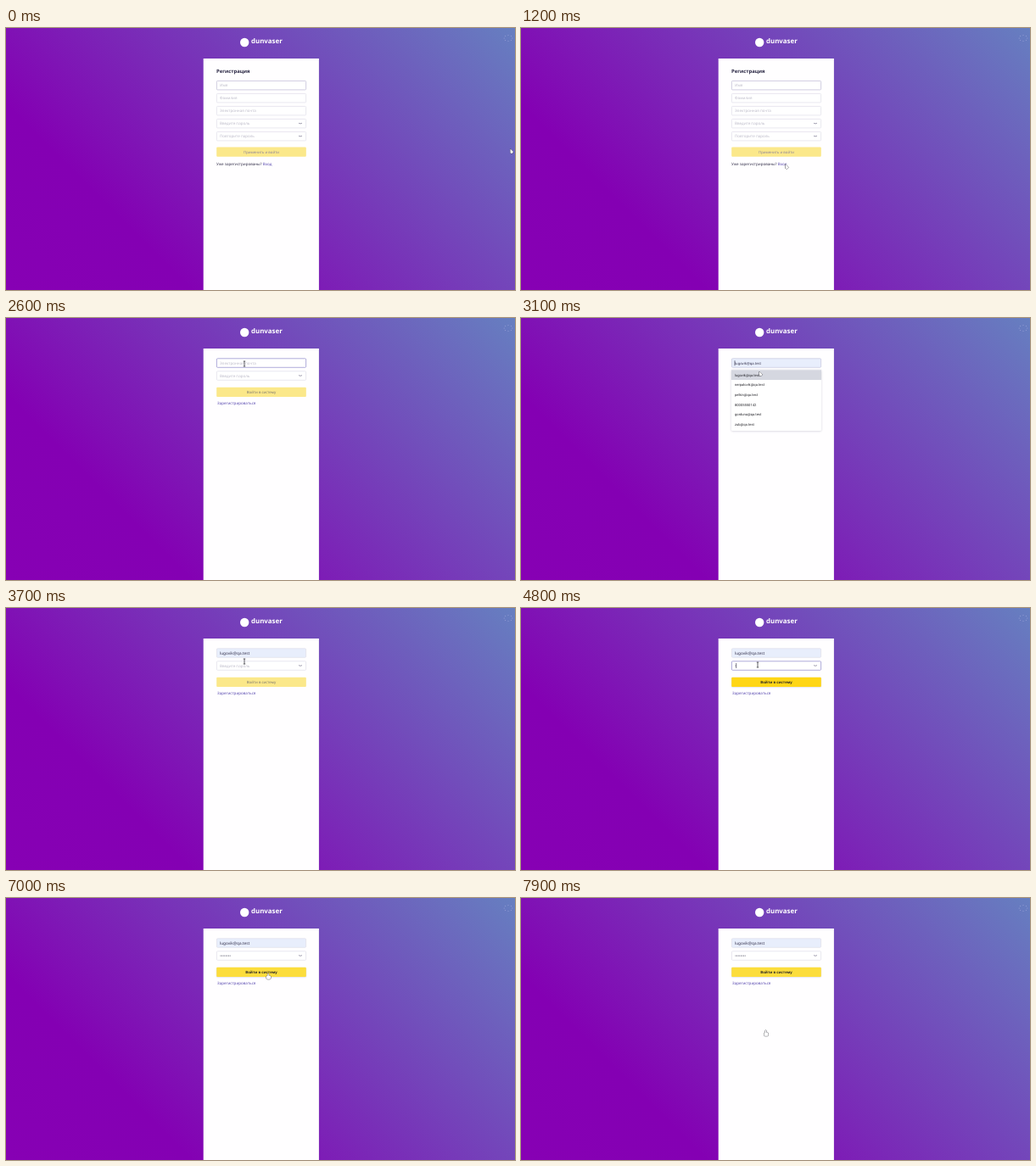
Write an HTML page with a canvas that moves like this. It is 600 px wide and 309 px high and loops after 8 s.

```html
<!DOCTYPE html>
<html lang="ru">
<head>
<meta charset="utf-8">
<title>Вход</title>
<style>
html, body { margin: 0; width: 100%; height: 100%; overflow: hidden; background: #7a20b6; }
canvas { display: block; width: 600px; height: 309px; }
</style>
</head>
<body>
<canvas id="stage"></canvas>
<script>
const W = 600, H = 309, LOOP = 8000, STEP = 100;
const LEFT = 248, ROW = 15;
const canvas = document.getElementById('stage');
const ctx = canvas.getContext('2d');
const dpr = window.devicePixelRatio || 1;
canvas.width = W * dpr;
canvas.height = H * dpr;

const FONT = '"Noto Sans", "Open Sans", sans-serif';
const LIST_FONT = 'Roboto, Inter, sans-serif';
const INK = '#35324c', HINT = '#bdbbc9', LINK = '#5a4bb0', LINE = '#e0deea', FOCUS = '#8f89cc';
const LOGIN = 'lugovik@qa.test';
const SUGGESTIONS = [LOGIN, 'nerpalovik@qa.test', 'pelkin@qa.test', '80005550142', 'gorduna@qa.test', 'zub@qa.test'];
const SIGN_UP_FIELDS = ['Имя', 'Фамилия', 'Электронная почта', 'Введите пароль', 'Повторите пароль'];

// Moments of the story, ms
const AT = { hoverLink: 1300, signIn: 1800, focus: 2600, list: 2700, pick: 2900, picked: 3700, password: 4200, typing: 4800, blur: 6100, press: 7250 };

// Pointer legs; sag bends the path downwards
const START = { x: 594.5, y: 142.5 };
const LEGS = [
  { from: 300, to: 1250, x: 309.5, y: 160, sag: 28 },
  { from: AT.signIn, to: AT.focus, x: 281, y: 54 },
  { from: AT.list, to: AT.pick, x: 281, y: 63 },
  { from: AT.picked, to: AT.password, x: 279, y: 67 },
  { from: 5700, to: 6200, x: 334.5, y: 128 },
  { from: 6300, to: 6900, x: 309, y: 89 },
  { from: AT.press, to: 7900, x: 288.5, y: 156, sag: 100 }
];

const clamp = v => Math.max(0, Math.min(1, v));
const ease = k => k * k * (3 - 2 * k);

function pointerAt(t) {
  let { x, y } = START;
  for (const leg of LEGS) {
    const e = ease(clamp((t - leg.from) / (leg.to - leg.from)));
    x += (leg.x - x) * e;
    y += (leg.y - y) * e + (leg.sag || 0) * Math.sin(Math.PI * e);
  }
  return { x, y };
}

function text(str, x, y, size, color, { weight = 400, align = 'left', family = FONT } = {}) {
  ctx.font = `${weight} ${size}px ${family}`;
  ctx.textAlign = align;
  ctx.fillStyle = color;
  ctx.fillText(str, x, y);
}

function box(x, y, w, h, fill, stroke, r = 1) {
  ctx.beginPath();
  ctx.roundRect(x, y, w, h, r);
  ctx.fillStyle = fill;
  ctx.fill();
  if (!stroke) return;
  ctx.strokeStyle = stroke;
  ctx.lineWidth = 0.7;
  ctx.stroke();
}

function dot(x, y, r, color) {
  ctx.beginPath();
  ctx.arc(x, y, r, 0, Math.PI * 2);
  ctx.fillStyle = color;
  ctx.fill();
}

function shadowed(alpha, blur, draw) {
  ctx.save();
  ctx.shadowColor = `rgba(40, 30, 80, ${alpha})`;
  ctx.shadowBlur = blur * dpr;
  ctx.shadowOffsetY = 0.6 * dpr;
  draw();
  ctx.restore();
}

function field(y, label, { color = HINT, fill = '#fff', border = LINE, size = 4.5, secret = false } = {}) {
  box(LEFT + 0.4, y + 0.4, 105.2, 10.5, fill, border);
  text(label, LEFT + 4, y + 7.3, size, color);
  if (!secret) return;
  ctx.beginPath();
  ctx.moveTo(LEFT + 97, y + 5.2);
  ctx.quadraticCurveTo(LEFT + 99, y + 6.6, LEFT + 101, y + 5.2);
  ctx.strokeStyle = '#8a879c';
  ctx.lineWidth = 0.8;
  ctx.stroke();
}

function button(y, label, fill, color, weight, shade) {
  shadowed(shade, 1.5, () => box(LEFT + 0.2, y, 105.6, 11.1, fill));
  text(label, LEFT + 53, y + 7.1, 4.3, color, { weight, align: 'center' });
}

function caret(x, y) {
  ctx.fillStyle = '#25233a';
  ctx.fillRect(x - 0.3, y - 3, 0.6, 6);
}

function backdrop() {
  const d = (W + H) / 4;
  const g = ctx.createLinearGradient(W / 2 - d, H / 2 + d, W / 2 + d, H / 2 - d);
  g.addColorStop(0, '#8700b4');
  g.addColorStop(0.24, '#8400b3');
  g.addColorStop(1, '#667fc0');
  ctx.fillStyle = g;
  ctx.fillRect(0, 0, W, H);

  dot(281.2, 17, 5.2, '#fff');
  text('dunvaser', 289, 18.2, 7.9, '#fff', { weight: 600 });

  // Expand icon
  for (let a = 0; a < 8; a++)
    dot(592 + 4.8 * Math.cos(a * Math.PI / 4), 12 + 3.6 * Math.sin(a * Math.PI / 4), 0.5, 'rgba(215, 205, 245, .5)');

  box(232.7, 36, 136.2, H, '#fffeff', null, 0);
}

function signUp() {
  text('Регистрация', LEFT, 53.4, 5.9, '#2b2845', { weight: 700 });
  SIGN_UP_FIELDS.forEach((label, i) =>
    field(62 + i * ROW, label, { border: i ? LINE : '#bdb9d4', secret: label.endsWith('пароль') }));
  button(140.6, 'Применить и войти', '#fbe88a', '#8d839a', 400, 0);
  const ask = 'Уже зарегистрированы? ';
  text(ask, LEFT, 162.4, 4.5, INK);
  text('Вход', LEFT + ctx.measureText(ask).width, 162.4, 4.5, LINK);
}

function suggestions(active) {
  shadowed(0.22, 2.5, () => box(LEFT, 61, 106, 72, '#fff'));
  if (active) box(LEFT, 61.3, 106, 11.8, '#d5d7e0', null, 0);
  SUGGESTIONS.forEach((s, i) => text(s, LEFT + 4, 68.7 + i * 11.6, 4.1, '#26262c', { family: LIST_FONT }));
}

function signIn(t, hover) {
  const picked = t >= AT.picked, preview = t >= AT.pick && !picked;
  if (picked || preview)
    field(47.4, LOGIN, { color: INK, fill: '#e8eefc', border: preview ? '#c6c6de' : LINE, size: picked ? 4.7 : 4.15 });
  else
    field(47.4, 'Электронная почта', { border: t >= AT.focus ? FOCUS : LINE });
  if (t >= AT.focus && !picked && t % 1000 < 600) caret(LEFT + 4, 53.2);

  const typed = Math.min(8, Math.max(0, Math.floor((t - AT.typing) / 130) + 1));
  const focused = t >= AT.password && t < AT.blur + 2 * STEP;
  field(62.4, typed ? '' : 'Введите пароль', { border: focused && t < AT.blur ? FOCUS : LINE, secret: true });
  for (let i = 0; i < typed; i++) dot(LEFT + 5 + i * 1.6, 68.1, 0.55, '#6b697d');
  if (focused) caret(LEFT + 4.2 + typed * 1.6, 68);

  if (typed) button(81.8, 'Войти в систему', hover ? '#fcdd3c' : '#ffd616', '#2d2926', 600, 0.18);
  else button(81.8, 'Войти в систему', '#fbe88a', '#7d7770', 500, 0);
  text('Зарегистрироваться', LEFT + 1, 102, 4.5, LINK);
  if (t >= AT.list && !picked) suggestions(preview);
}

function statusBubble(alpha) {
  ctx.globalAlpha = alpha;
  box(0, 301.5, 54.5, 8, '#f5f3fa', null, 0);
  text('qa.test/login', 3, 306.8, 4.1, '#464455', { family: LIST_FONT });
  ctx.globalAlpha = 1;
}

const CURSORS = {
  arrow() {
    ctx.moveTo(0, 0);
    ctx.lineTo(0, 5);
    ctx.lineTo(2, 5.6);
    ctx.lineTo(3.5, 3.6);
    ctx.closePath();
  },
  hand() {
    ctx.roundRect(-2, 2.6, 5, 4.2, 1.2);
    ctx.roundRect(-0.6, 0, 1.3, 4.5, 0.6);
  },
  beam() {
    for (const y of [-3, 3]) {
      ctx.moveTo(-1.2, y);
      ctx.lineTo(1.2, y);
    }
    ctx.moveTo(0, -3);
    ctx.lineTo(0, 3);
  }
};

function pointer(kind, { x, y }) {
  ctx.save();
  ctx.translate(x, y);
  ctx.beginPath();
  CURSORS[kind]();
  ctx.strokeStyle = '#3a3a42';
  ctx.lineWidth = 0.8;
  ctx.stroke();
  ctx.fillStyle = '#fff';
  if (kind !== 'beam') ctx.fill();
  ctx.restore();
}

function pointerKind(t, over) {
  if (t < AT.signIn) return t >= AT.hoverLink ? 'hand' : 'arrow';
  if (t >= AT.press || (t >= AT.typing && over(81, 94))) return 'hand';
  return over(47, 59) || (t >= AT.picked && over(62, 74)) ? 'beam' : 'arrow';
}

function draw(t) {
  ctx.setTransform(dpr, 0, 0, dpr, 0, 0);
  ctx.textRendering = 'geometricPrecision';
  const p = pointerAt(t);
  const over = (top, bottom) => p.x > LEFT && p.x < LEFT + 106 && p.y > top && p.y < bottom;
  backdrop();
  if (t < AT.signIn) signUp();
  else signIn(t, t >= AT.press || over(81, 94));
  if (t >= AT.hoverLink && t < AT.signIn + STEP) statusBubble(t < AT.signIn ? 0.9 : 0.5);
  pointer(pointerKind(t, over), p);
}

function tick(now) {
  draw(Math.floor((now % LOOP) / STEP) * STEP);
  requestAnimationFrame(tick);
}
requestAnimationFrame(tick);
</script>
</body>
</html>
```
